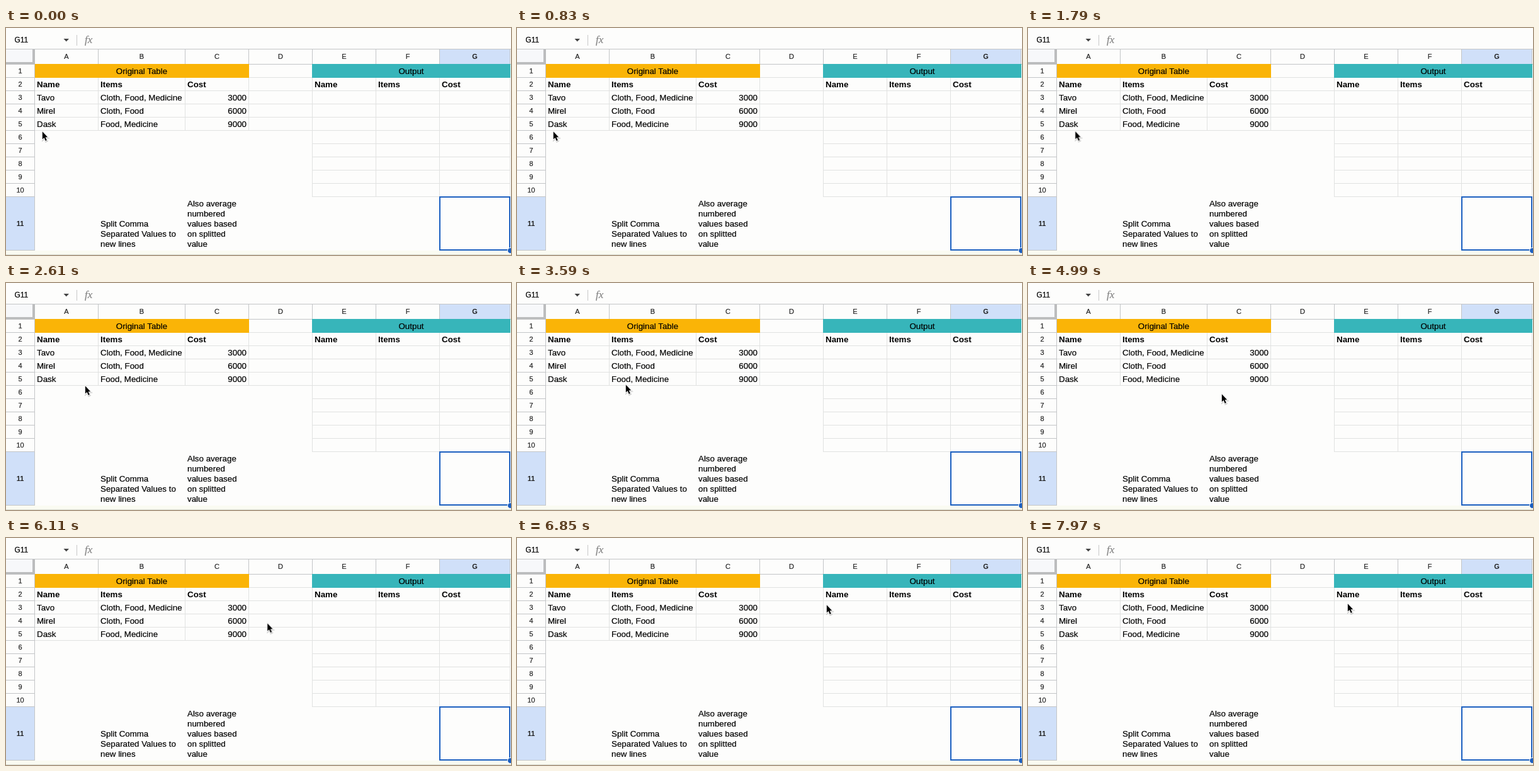
Recreate the animation shown at these times as an HTML page. Size 802x360 px, loop 8 s.

```html
<!DOCTYPE html>
<html lang="en">
<head>
<meta charset="utf-8">
<title>Spreadsheet</title>
<style>
html, body { margin: 0; width: 100%; height: 100%; overflow: hidden; background: #fdfdfc; }
svg { display: block; width: 802px; height: 360px; }
text { font: 13.333px Arial, "Liberation Sans", sans-serif; fill: #000; stroke: #000; stroke-width: .2px; }
.head { font-size: 11px; fill: #222; stroke: #222; }
.bold { font-weight: bold; stroke: none; }
.mid { text-anchor: middle; }
.end { text-anchor: end; }
.cell-name { font-size: 12px; }
.formula { font: italic 17px "Liberation Serif", serif; fill: #858585; stroke: #858585; }
</style>
</head>
<body>
<svg id="sheet" viewBox="0 0 802 360" xmlns="http://www.w3.org/2000/svg"></svg>
<script>
const NS = "http://www.w3.org/2000/svg";
const sheet = document.getElementById("sheet");
const cols = [45, 146, 284, 385, 486, 587, 688, 800];
const rows = [57, 78, 99, 120, 141, 162, 183, 204, 225, 246, 267, 352];
const PAPER = "#fdfdfc", GRID = "#e1e2e1", EDGE = "#c3c5c7", PICKED = "#d0e0f9", ACCENT = "#1b5fc0";

function add(tag, attrs, parent = sheet) {
  const el = document.createElementNS(NS, tag);
  for (const key in attrs) el.setAttribute(key, attrs[key]);
  return parent.appendChild(el);
}
const rect = (x, y, width, height, fill) => add("rect", { x, y, width, height, fill });
const hline = (x1, x2, y, color = GRID) => rect(x1, y, x2 - x1, 1, color);
const vline = (x, y1, y2, color = GRID) => rect(x, y1, 1, y2 - y1, color);
function label(str, x, y, cls = "") {
  add("text", { x, y, class: cls }).textContent = str;
}

// Formula bar
rect(0, 0, 802, 360, PAPER);
label("G11", 13.5, 23, "cell-name");
add("path", { d: "M91.5 17h8.5l-4.25 4.5z", fill: "#444" });
vline(112, 11, 28, "#c8c8c8");
label("fx", 125, 24, "formula");
hline(0, 802, 33, EDGE);

// Gridlines
for (const y of rows.slice(1, 6)) hline(46, 486, y);
for (const y of rows.slice(1, 11)) hline(486, 801, y);
for (const x of [146, 284, 385]) vline(x, 78, 163);
for (const x of cols.slice(4)) vline(x, 57, 268);

// Headers
rect(689, 34, 112, 23, PICKED);
rect(0, 268, 45, 84, PICKED);
for (const x of cols) vline(x, 34, 57, EDGE);
for (const y of rows.slice(1)) hline(0, 45, y, EDGE);
hline(0, 802, 57, EDGE);
vline(45, 34, 353, EDGE);
rect(0, 34, 42, 20, "#f7f8fa");
rect(42, 34, 4, 24, "#bcbdbe");
rect(0, 54, 46, 4, "#bcbdbe");
rect(46, 57, 340, 22, "#fab407");
rect(486, 57, 315, 22, "#37b5ba");
[..."ABCDEFG"].forEach((name, i) =>
  label(name, (cols[i] + cols[i + 1] + 1) / 2, 49, "head mid" + (name === "G" ? " bold" : "")));
for (let i = 0; i < 11; i++)
  label(i + 1, 22.5, (rows[i] + rows[i + 1]) / 2 + 4, "head mid" + (i === 10 ? " bold" : ""));

// Cells
label("Original Table", 215.5, 73, "mid");
label("Output", 643.5, 73, "mid");
for (const start of [0, 4])
  ["Name", "Items", "Cost"].forEach((str, i) => label(str, cols[start + i] + 4, 94, "bold"));
[
  ["Tavo", "Cloth, Food, Medicine", 3000],
  ["Mirel", "Cloth, Food", 6000],
  ["Dask", "Food, Medicine", 9000]
].forEach(([name, items, cost], i) => {
  const y = 115 + 21 * i;
  label(name, 49, y);
  label(items, 150, y);
  label(cost, 382, y, "end");
});
function note(lines, x) {
  lines.forEach((str, i) => label(str, x, 347 - 16 * (lines.length - 1 - i)));
}
note(["Split Comma", "Separated Values to", "new lines"], 150);
note(["Also average", "numbered", "values based", "on splitted", "value"], 288);

// Selection and bottom edge
rect(0, 353, 802, 7, "#fafbf2");
hline(0, 802, 359, "#d9dbd0");
add("rect", { x: 689, y: 268, width: 111, height: 84, fill: "none", stroke: ACCENT, "stroke-width": 2 });
add("circle", { cx: 801, cy: 353, r: 4.5, fill: ACCENT, stroke: PAPER });

// Pointer
const pointer = add("g", {});
const arrow = "M.8 1.2V13.6L3.6 11L5.8 16L7.8 15.1L5.6 10.3H9.2Z";
add("path", { d: arrow, transform: "translate(.5 1)", fill: "none", stroke: "#000", "stroke-width": 2.6, opacity: .2 }, pointer);
add("path", { d: arrow, fill: "#000", stroke: "#fff", "stroke-width": 1.8, "paint-order": "stroke" }, pointer);

const LOOP = 8000;
const path = [
  [0, 57, 163], [1510, 57, 163], [2610, 125, 162], [3590, 172, 160],
  [4030, 180, 161], [4720, 307, 175], [5690, 307, 175],
  [6400, 488, 106], [6850, 491, 105], [7970, 507, 103], [LOOP, 507, 103]
];
pointer.animate(
  path.map(([t, x, y]) => ({ offset: t / LOOP, transform: `translate(${x}px, ${y}px)` })),
  { duration: LOOP, iterations: Infinity }
);
</script>
</body>
</html>
```
